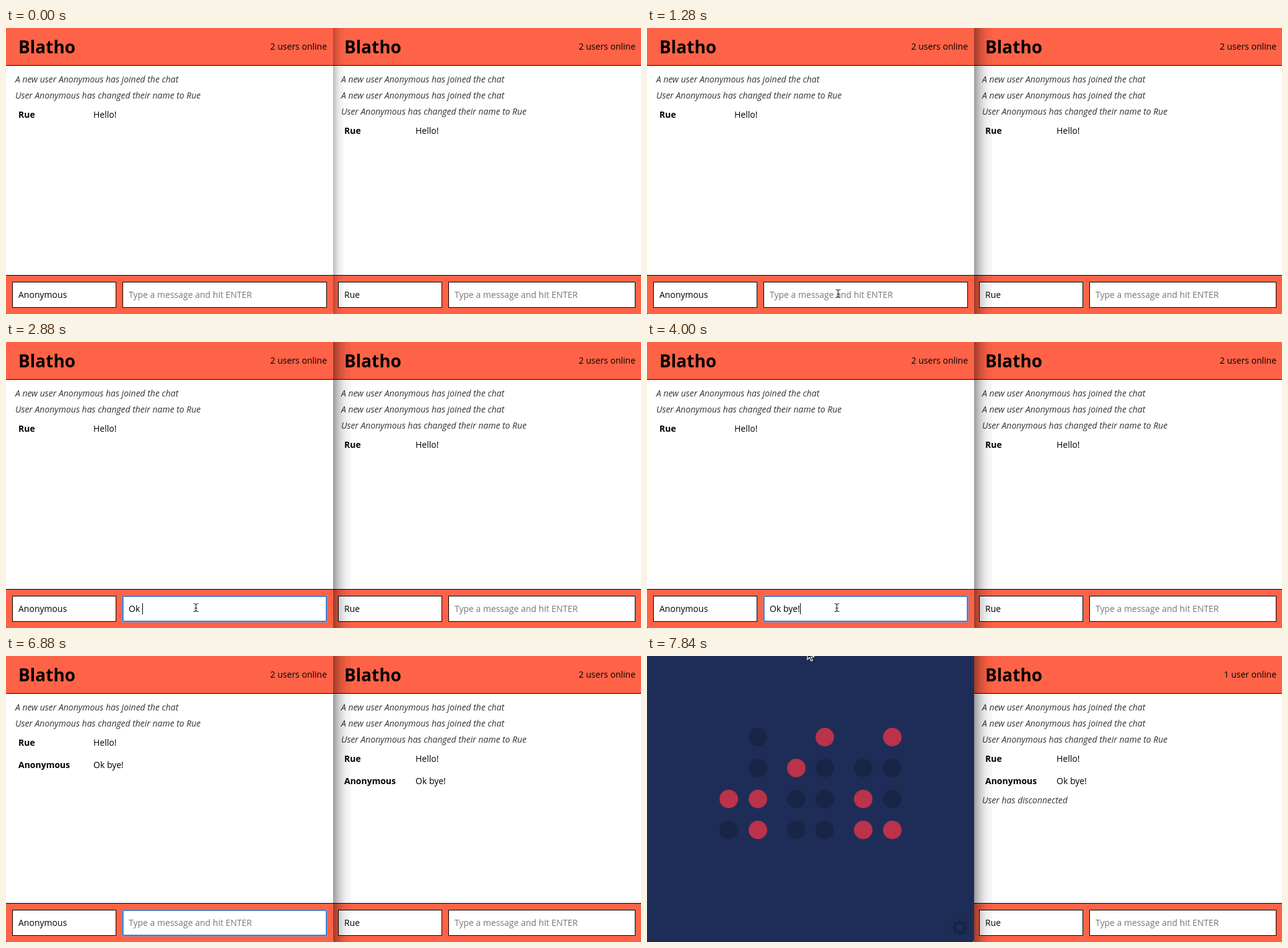
An HTML page with a canvas that plays this animation: 1025x462 px, repeating every 8 s.

```html
<!DOCTYPE html>
<html lang="en">
<head>
<meta charset="utf-8">
<title>Chat demo</title>
<style>
  html, body { margin: 0; width: 1025px; height: 462px; overflow: hidden; }
  canvas { display: block; }
</style>
</head>
<body>
<canvas id="stage" width="1025" height="462"></canvas>
<script>
const ctx = document.getElementById('stage').getContext('2d');
const LOOP = 8000, STEP = 160;
const EDGE = 528, HEIGHT = 462;
const TOMATO = '#ff6347', NIGHT = '#1e2d58', RED = '#bb324b', UNLIT = '#182546';
const TITLE = 'Blatho', USER = 'Rue', GUEST = 'Anonymous';
const HINT = 'Type a message and hit ENTER';

const JOINED = `A new user ${GUEST} has joined the chat`;
const RENAMED = `User ${GUEST} has changed their name to ${USER}`;

// [start time, typed text]
const TYPING = [[0, ''], [2400, 'O'], [2560, 'Ok'], [2880, 'Ok '], [3200, 'Ok b'],
  [3360, 'Ok by'], [3520, 'Ok bye'], [4000, 'Ok bye!'], [4480, '']];
const FOCUS = 1440, SENT = 4480, LEAVE = 7040;

// Pointer paths as [time, x, y]
const PATHS = [
  [[160, 336, 2], [480, 326, 170], [800, 318, 290], [1119, 318, 290],
   [1280, 308, 429], [1440, 308, 429], [1600, 306, 429], [4800, 306, 429],
   [4960, 302, 350], [5120, 290, 190], [5280, 276, 36], [5439, 276, 36]],
  [[7680, 260, -13], [7840, 259, -9], [8000, 259, -9]]
];

// Clock columns: x, number of lamps, previous digit, new digit
const COLUMNS = [[132, 2, 2, 2], [179, 4, 3, 3], [241, 3, 4, 4],
  [287, 4, 7, 8], [349, 3, 3, 3], [396, 4, 5, 9]];

const clamp = v => Math.max(0, Math.min(1, v));
const latest = (list, t) => list.filter(e => e[0] <= t).pop();

function rect(x, y, w, h, color) {
  ctx.fillStyle = color;
  ctx.fillRect(x, y, w, h);
}

function text(str, x, y, color = '#000', style = '', size = 14, align = 'left') {
  ctx.font = `${style} ${size}px "Open Sans", sans-serif`;
  ctx.textAlign = align;
  ctx.fillStyle = color;
  ctx.fillText(str, x, y);
}

function field(x, w, value, focused) {
  rect(x, 410, w, 42, '#000');
  rect(x + 1, 411, w - 2, 40, '#fff');
  if (focused) {
    ctx.beginPath();
    ctx.roundRect(x + .5, 410.5, w - 1, 41, 1);
    ctx.strokeStyle = '#6ba3e2';
    ctx.lineWidth = 3;
    ctx.stroke();
    ctx.strokeStyle = '#2e69b3';
    ctx.lineWidth = 1;
    ctx.stroke();
  }
  text(value || HINT, x + 10, 436, value ? '#000' : '#777');
}

function chat(win) {
  const { x, right, notes, messages, online, name, draft = '', focused } = win;
  rect(x, 0, right - x, HEIGHT, '#fff');
  rect(x, 0, right - x, 60, TOMATO);
  rect(x, 60, right - x, 1, '#000');
  rect(x, 399, right - x, 1, '#000');
  rect(x, 400, right - x, 62, TOMATO);
  text(TITLE, x + 20, 41, '#000', 'bold', 28);
  text(online, win.inputEnd, 35, '#000', '', 14, 'right');

  let y = 88;
  for (const note of notes) {
    text(note, x + 15, y, '#333', 'italic');
    y += 26;
  }
  y += 5;
  for (const [author, body] of messages) {
    text(author, x + 20, y, '#000', 'bold');
    text(body, win.bodyX, y);
    y += 36;
  }
  if (win.gone) text('User has disconnected', x + 15, y - 5, '#333', 'italic');

  field(x + 10, 168, name);
  field(x + 188, win.inputEnd - x - 188, draft, focused);
}

function shadow(active) {
  const width = active ? 29 : 17, strength = active ? .36 : .23;
  for (let i = 0; i < width; i++) {
    const alpha = strength * (1 - i / width) ** 2 + .03;
    rect(EDGE + i, 0, 1, HEIGHT, `rgba(0,0,0,${alpha})`);
  }
}

function dot(x, y, color, alpha) {
  ctx.globalAlpha = alpha;
  ctx.fillStyle = color;
  ctx.beginPath();
  ctx.arc(x, y, 15, 0, 7);
  ctx.fill();
  ctx.globalAlpha = 1;
}

function gear(x, y, alpha) {
  ctx.save();
  ctx.globalAlpha = alpha;
  ctx.translate(x, y);
  ctx.fillStyle = UNLIT;
  ctx.beginPath();
  for (let i = 0; i < 8; i++) {
    for (const [r, turn] of [[10.5, -.3], [14, -.19], [14, .19], [10.5, .3]]) {
      const a = i * Math.PI / 4 + turn;
      ctx.lineTo(r * Math.cos(a), r * Math.sin(a));
    }
  }
  ctx.closePath();
  ctx.moveTo(5, 0);
  ctx.arc(0, 0, 5, 0, 2 * Math.PI);
  ctx.fill('evenodd');
  ctx.restore();
}

function clock(t) {
  rect(0, 0, EDGE, HEIGHT, NIGHT);
  const change = clamp((t - 6910) / 330), appear = clamp((t - LEAVE) / 320);
  for (const [x, lamps, before, after] of COLUMNS) {
    for (let bit = 0; bit < lamps; bit++) {
      const y = 281 - bit * 50;
      const from = before >> bit & 1, to = after >> bit & 1;
      dot(x, y, UNLIT, appear);
      dot(x, y, RED, from + (to - from) * change);
    }
  }
  gear(505, 439, appear);
}

function leftChat(t) {
  const draft = latest(TYPING, t)[1], focused = t >= FOCUS;
  chat({
    x: 0, right: EDGE, inputEnd: 518, bodyX: 141, online: '2 users online',
    notes: [JOINED, RENAMED], name: GUEST, draft, focused,
    messages: [[USER, 'Hello!'], ...(t >= SENT ? [[GUEST, 'Ok bye!']] : [])]
  });
  const blinkStart = t < 2400 ? FOCUS : SENT;
  const caretOn = draft || Math.floor((t - blinkStart) / 480) % 2 === 0;
  if (focused && caretOn) {
    ctx.font = '14px "Open Sans", sans-serif';
    const x = 198 + Math.round(ctx.measureText(draft).width);
    rect(x, 422, 1, draft ? 18 : 19, '#000');
  }
}

function strokeTwice(path) {
  for (const [color, width] of [['rgba(255,255,255,.8)', 2.6], ['#333', 1.2]]) {
    ctx.strokeStyle = color;
    ctx.lineWidth = width;
    ctx.stroke(path);
  }
}

function pointer(t) {
  const path = PATHS.find(p => t >= p[0][0] && t < p[p.length - 1][0]);
  if (!path) return;
  const i = path.findIndex(p => p[0] > t);
  const [t0, x0, y0] = path[i - 1], [t1, x1, y1] = path[i];
  const k = (t - t0) / (t1 - t0);
  const x = x0 + (x1 - x0) * k, y = y0 + (y1 - y0) * k;
  ctx.save();
  ctx.translate(Math.round(x), Math.round(y));
  if (t < LEAVE && y > 410) {
    strokeTwice(new Path2D(
      'M-3.5-6.5Q0-6.5 .5-4.5Q1-6.5 4.5-6.5M.5-5V5M-2 1H3M-3.5 6.5Q0 6.5 .5 4.5Q1 6.5 4.5 6.5'));
  } else {
    const arrow = new Path2D('M0 0V14.5L3.4 11.2L5.8 17L8.2 16L5.8 10.5H10.5Z');
    ctx.fillStyle = '#111';
    ctx.fill(arrow);
    ctx.strokeStyle = '#fff';
    ctx.lineWidth = 1.2;
    ctx.stroke(arrow);
  }
  ctx.restore();
}

function draw(t) {
  const gone = t >= LEAVE;
  rect(0, 0, EDGE, HEIGHT, '#222');
  chat({
    x: 526, right: 1025, inputEnd: 1016, bodyX: 661,
    online: gone ? '1 user online' : '2 users online',
    notes: [JOINED, JOINED, RENAMED], name: USER, gone,
    messages: [[USER, 'Hello!'], ...(t >= SENT ? [[GUEST, 'Ok bye!']] : [])]
  });
  shadow(t >= 480);

  ctx.save();
  ctx.beginPath();
  ctx.roundRect(0, 0, EDGE, HEIGHT, [0, 0, 4, 4]);
  ctx.clip();
  if (gone) clock(t);
  else leftChat(t);
  ctx.restore();
  pointer(t);
}

function tick() {
  const t = performance.now() % LOOP;
  draw(Math.floor(t / STEP) * STEP);
  requestAnimationFrame(tick);
}
tick();
</script>
</body>
</html>
```
